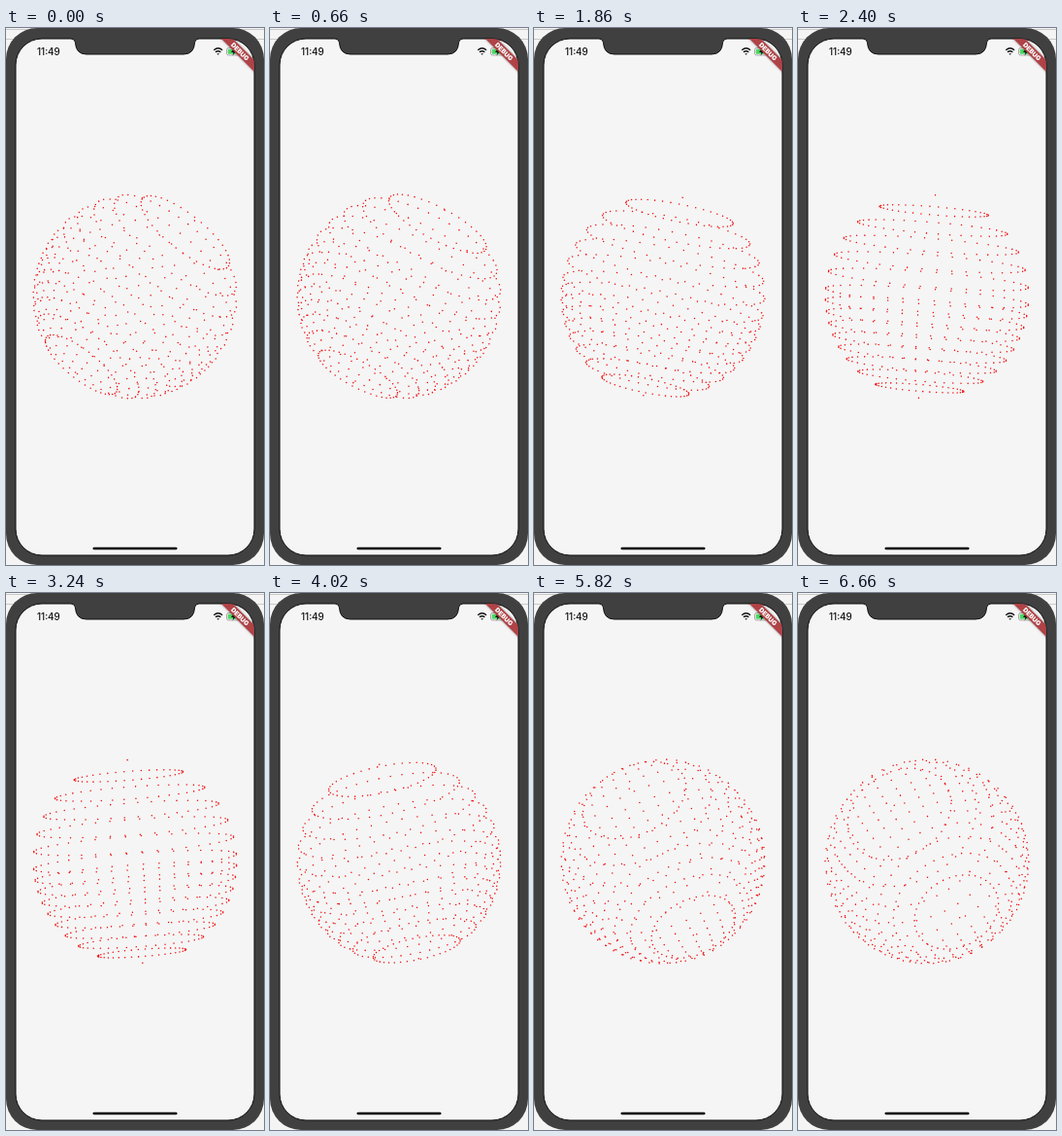
An HTML page that plays this animation: 266 px wide and 552 px high, repeating every 6.72 s.

```html
<!DOCTYPE html>
<html lang="en">
<head>
<meta charset="utf-8">
<title>Rotating dotted sphere</title>
<style>
  html, body { margin: 0; width: 100%; height: 100%; overflow: hidden; background: #f4f4f4; }
  svg { display: block; width: 266px; height: 552px; }
  text { font-family: Inter, Roboto, sans-serif; }
</style>
</head>
<body>
<svg viewBox="0 0 266 552">
  <defs>
    <path id="outline" d="M37 11H67Q71 11 71.500 15Q72 27 83 27H183Q194 27 194.500 15Q195 11 199 11H229A27 27 0 0 1 256 38V515A27 27 0 0 1 229 542H37A27 27 0 0 1 10 515V38A27 27 0 0 1 37 11Z"/>
    <clipPath id="screen"><use href="#outline"/></clipPath>
    <filter id="soft" x="-20%" y="-50%" width="140%" height="200%"><feGaussianBlur stdDeviation="1.2"/></filter>
  </defs>

  <!-- phone body and notched screen -->
  <path d="M0 1.500H266M0 11.500H266" stroke="#c9c9c9"/>
  <rect width="266" height="552" rx="32" fill="#404040"/>
  <use href="#outline" fill="#f5f5f5" stroke="#111"/>

  <!-- status bar -->
  <text x="32" y="28" font-size="9.8" font-weight="500" fill="#111">11:49</text>
  <g fill="none" stroke="#111" stroke-width="1.4">
    <path d="M214.300 22.700Q218.700 18.900 223.100 22.700M216 24.800Q218.700 22.500 221.400 24.800"/>
    <path d="M217.300 26.200H220.100L218.700 27.700Z" fill="#111" stroke="none"/>
  </g>
  <rect x="227.500" y="20.500" width="15" height="7.500" rx="2" fill="none" stroke="#888" stroke-width=".7"/>
  <rect x="228.700" y="21.700" width="12.500" height="5" rx="1" fill="#4cd964"/>
  <path d="M235.500 20.500L232 25H234.500L233.500 28.500L237.500 23.500H235Z" fill="#111"/>

  <!-- corner banner -->
  <g clip-path="url(#screen)">
    <g transform="translate(241.250 24.250) rotate(45)">
      <rect x="-30" y="-4.200" width="60" height="8.400" fill="#000" opacity=".45" filter="url(#soft)"/>
      <rect x="-30" y="-4.200" width="60" height="8.400" fill="#b04347"/>
      <text y="2.400" font-size="6.600" font-weight="900" fill="#fff" text-anchor="middle">DEBUG</text>
    </g>
  </g>

  <rect x="89.500" y="533.700" width="87" height="2.600" rx="1.300" fill="#000"/>
  <path id="dots" fill="none" stroke="#f01010" stroke-width="1.55" stroke-linecap="round"/>
</svg>

<script>
const LOOP = 6720, STEP = 60;
const CX = 133, CY = 276, R = 105, PER_RING = 40;
const START = -52.2, SPEED = 18.5; // degrees, degrees per second

// Rings of equal height steps: coarser above the equator, finer below.
const heights = [0];
for (let k = 1; k <= 5; k++) heights.push(k * 0.16875);
for (let k = 1; k <= 8; k++) heights.push(-k * 0.1125);

const points = [[0, 1, 0], [0, -1, 0]];
for (const y of heights) {
  const r = Math.sqrt(1 - y * y);
  for (let i = 0; i < PER_RING; i++) {
    const a = i / PER_RING * 2 * Math.PI;
    points.push([r * Math.cos(a), y, r * Math.sin(a)]);
  }
}

const dots = document.getElementById("dots");
const third = deg => (1 + 2 * Math.cos(deg * Math.PI / 180)) / 3;

// Orthographic view of a turn around the diagonal (1, 1, 1).
function draw(ms) {
  const turn = START + SPEED * ms / 1000;
  const p = third(turn), q = third(turn - 120), r = third(turn + 120);
  dots.setAttribute("d", points.map(([x, y, z]) => {
    const sx = CX + R * (p * x + r * y + q * z);
    const sy = CY - R * (q * x + p * y + r * z);
    return `M${sx.toFixed(2)} ${sy.toFixed(2)}h0`;
  }).join(""));
}

const begin = performance.now();
function tick() {
  const ms = (performance.now() - begin) % LOOP;
  draw(Math.floor(ms / STEP) * STEP);
  requestAnimationFrame(tick);
}
tick();
</script>
</body>
</html>
```
